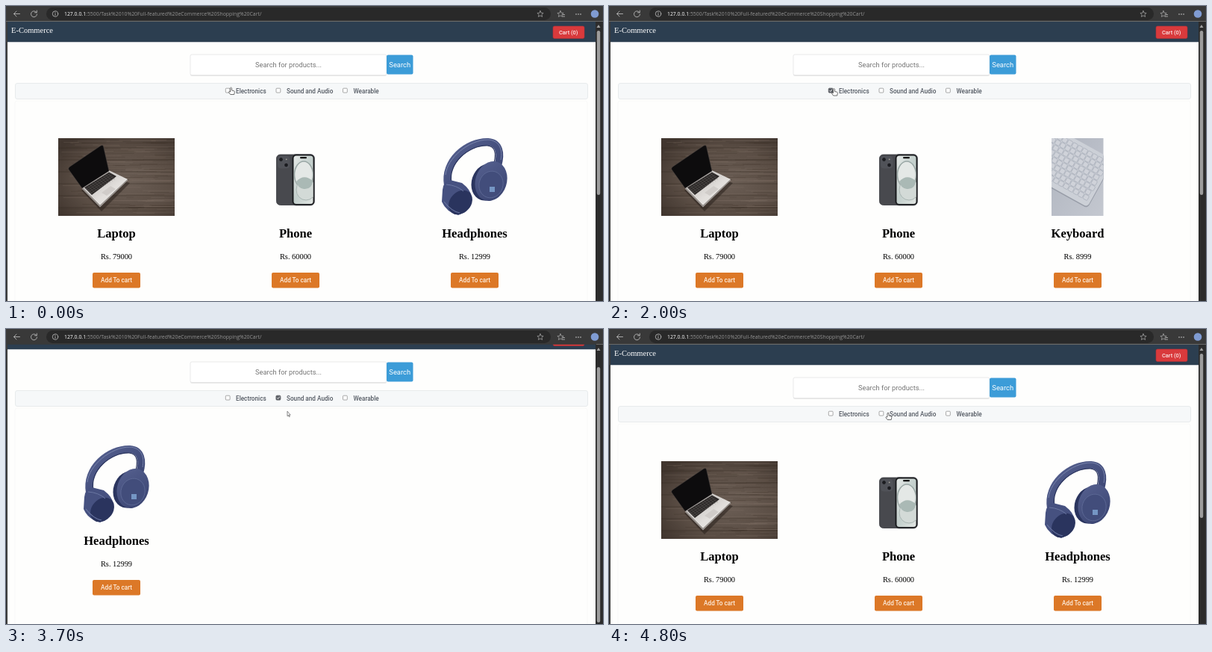
Write an HTML page that moves like this. It is 800 px wide and 395 px high and loops after 5000 ms.

```html
<!DOCTYPE html>
<html lang="en">
<head>
<meta charset="utf-8">
<title>E-Commerce</title>
<style>
  html, body { margin: 0; width: 100%; height: 100%; overflow: hidden; background: #fefefe; }
  svg { display: block; width: 800px; height: 395px; }
  .serif { font-family: "Liberation Serif", serif; }
  .sans { font-family: Roboto, sans-serif; }
  .mid { text-anchor: middle; }
  .line { fill: none; stroke: #c4c4c4; stroke-width: .8; stroke-linecap: round; stroke-linejoin: round; }
</style>
</head>
<body>
<svg viewBox="0 0 800 395">
  <defs>
    <radialGradient id="wood" cx=".58" cy=".55" r=".7">
      <stop offset="0" stop-color="#6c5f56"/><stop offset=".6" stop-color="#5a4d44"/><stop offset="1" stop-color="#41362f"/>
    </radialGradient>
    <linearGradient id="metal" x2="1" y2="1">
      <stop offset="0" stop-color="#b5b1ae"/><stop offset=".6" stop-color="#e2dfdc"/><stop offset="1" stop-color="#efedeb"/>
    </linearGradient>
    <linearGradient id="glass" x2="1" y2="1">
      <stop offset="0" stop-color="#e6eae8"/><stop offset=".5" stop-color="#c3cfcc"/><stop offset="1" stop-color="#e2e6e3"/>
    </linearGradient>
    <linearGradient id="desk" x2="1" y2="1">
      <stop offset="0" stop-color="#aeb3be"/><stop offset="1" stop-color="#c4c8d0"/>
    </linearGradient>
    <linearGradient id="navy" x2="1" y2="1">
      <stop offset="0" stop-color="#566190"/><stop offset="1" stop-color="#38426f"/>
    </linearGradient>
    <clipPath id="keyClip"><path d="M-35 177h69.500v104h-69.500z"/></clipPath>
    <clipPath id="screenClip"><rect x="-2.500" y="200.500" width="26" height="64.500" rx="3.500"/></clipPath>

    <g id="laptop">
      <path d="M-78 177h156v104h-156z" fill="url(#wood)"/>
      <g id="grain"></g>
      <path d="M-47 247L-10 226 18 237-20 275z" fill="#241d19" opacity=".5"/>
      <path d="M-46 243L-10 220 15 232-22 267z" fill="url(#metal)"/>
      <path d="M-43 243L-10 222.500 0 228-33 253z" fill="#2c2928"/>
      <g id="laptopKeys" stroke="#6a6562" stroke-width=".4"></g>
      <path d="M-20 250L-8 241-1 245-13 254z" fill="#d0ccc9"/>
      <path d="M-46 243L-22 267 15 232v1.700L-22 269.500-46 245z" fill="#9c9793"/>
      <path d="M-64 219Q-65 217-63 215.500L-21 187Q-18 185.500-17.500 188L-10 221-46 244z" fill="#0d0c0d" stroke="#4a4542" stroke-width=".5"/>
    </g>

    <g id="phone">
      <rect x="-25.500" y="199" width="34" height="67.500" rx="5" fill="#48494e" stroke="#34353a" stroke-width=".8"/>
      <rect x="-24" y="201" width="16.500" height="16.500" rx="4.500" fill="#505258"/>
      <g fill="#1b1c20" stroke="#66686f" stroke-width=".7">
        <circle cx="-19.500" cy="205.500" r="2.900"/><circle cx="-12.500" cy="213" r="2.900"/>
      </g>
      <circle cx="-12.300" cy="205.300" r=".9" fill="#aaa69c"/>
      <rect x="-5" y="198.500" width="30.500" height="68.500" rx="5.500" fill="#1b1c1f" stroke="#55575c" stroke-width=".7"/>
      <g clip-path="url(#screenClip)">
        <path d="M-3 200h27v66h-27z" fill="url(#glass)"/>
        <ellipse cx="11" cy="226" rx="12.500" ry="18" fill="#e4e8e6" stroke="#9aa7a5" stroke-width="1.500"/>
        <ellipse cx="14" cy="246" rx="13" ry="14" fill="#d3dad7" stroke="#a9b5b2"/>
        <path d="M1 235Q11 224 23 234 22 246 11 245 3 244 1 235z" fill="#aab9b5"/>
      </g>
      <rect x="6" y="202" width="9" height="2.300" rx="1.150" fill="#111"/>
    </g>

    <g id="keyboard" clip-path="url(#keyClip)">
      <path d="M-35 177h70v104h-70z" fill="url(#desk)"/>
      <g transform="translate(-2 222) rotate(29)">
        <rect x="-80" y="-38" width="116" height="72" rx="5" fill="#989da8" transform="translate(1 1.500)"/>
        <rect x="-80" y="-38" width="116" height="72" rx="5" fill="#ccd0d7"/>
        <g id="keys" fill="#cfd2d9" stroke="#a3a8b4" stroke-width=".6"></g>
      </g>
    </g>

    <g id="headphones">
      <path d="M-36 240C-42 208-10 181 18 182 33 183 36 197 31 214" fill="none" stroke="url(#navy)" stroke-width="10"/>
      <path d="M-39 226C-37 204-8 179 18 179 32 180 38 190 35 206" fill="none" stroke="#7783ab" stroke-width="1"/>
      <path d="M-31 236C-36 211-8 186 17 187 28 188 29 198 26 210" fill="none" stroke="#2c365f" stroke-width="1.200"/>
      <path d="M-43 246Q-42 235-33 233L-17 237Q-5 246-4 256-8 275-22 280-38 276-44 262z" fill="#465180"/>
      <ellipse cx="-19" cy="263" rx="18" ry="14" transform="rotate(-48 -19 263)" fill="#2a345e"/>
      <path d="M-41 262Q-31 275-20 277" fill="none" stroke="#6874a0" stroke-width="1.200"/>
      <path d="M-38 239Q-24 240-15 248" fill="none" stroke="#6b77a2" stroke-width="1"/>
      <ellipse cx="16" cy="236" rx="20" ry="25" transform="rotate(18 16 236)" fill="#2b355f"/>
      <ellipse cx="22" cy="234.500" rx="21" ry="27" transform="rotate(18 22 234.500)" fill="url(#navy)"/>
      <ellipse cx="22" cy="239" rx="16" ry="18" transform="rotate(18 22 239)" fill="#424d7b" stroke="#5f6b97" stroke-width=".8"/>
      <rect x="20" y="242" width="7" height="7" fill="#7596c4"/>
    </g>
  </defs>

  <path d="M0 0h800v395H0z" fill="#fefefd"/>
  <g id="page">
    <path d="M0 21h791v27.300H0z" fill="#2c3e50"/>
    <text class="serif" x="7" y="36" font-size="10.500" fill="#fff">E-Commerce</text>
    <rect x="733" y="27" width="42" height="16.500" rx="2" fill="#d93a3c" stroke="#b63237" stroke-width=".6"/>
    <text class="sans mid" x="753.700" y="38" font-size="7.400" font-weight="500" fill="#fbe9e9">Cart (0)</text>

    <rect x="247" y="66" width="263" height="28" rx="2" fill="#e9e9e9"/>
    <rect x="247" y="65" width="263" height="27.500" rx="2" fill="#fff" stroke="#e0e0e0" stroke-width=".7"/>
    <text class="sans mid" x="378.500" y="81.800" font-size="9.300" fill="#757575">Search for products...</text>
    <rect x="510" y="65.500" width="35.500" height="26" rx="2" fill="#3c9cd8"/>
    <text class="sans mid" x="527.700" y="81.800" font-size="9.350" fill="#fff">Search</text>

    <rect x="12.500" y="103.500" width="767" height="21" rx="2.500" fill="#f6f8f9" stroke="#e4e7e9" stroke-width=".8"/>
    <g id="filters" class="sans" font-size="8.200" font-weight="500" fill="#555b64"></g>
    <rect x="12" y="127" width="767" height="420" rx="3" fill="#fefefd" stroke="#f8f8f7" stroke-width=".8"/>
    <g id="cards"></g>
  </g>

  <path d="M0 21h2v374H0z" fill="#3a3a3a"/>
  <path d="M790 21h10v374h-10z" fill="#2c2c2c"/>
  <path d="M791.500 29l2.500-4 2.500 4z" fill="#a0a0a0"/>
  <rect id="thumb" x="791.800" width="4.400" rx="2.200" fill="#9c9c9c"/>

  <path d="M0 0h800v20.800H0z" fill="#393939"/>
  <rect x="54" y="2" width="676" height="17" rx="8.500" fill="#292929"/>
  <g class="line">
    <path d="M18.500 10.500h-8m3.500-3.500l-3.500 3.500 3.500 3.500"/>
    <path d="M40.800 8.500A4 4 0 1 0 41.500 11M41.300 6v2.800h-2.800"/>
    <circle cx="66" cy="10.500" r="3.700"/>
    <path d="M66 10v2.300M66 8.400v.1"/>
    <path id="star" d="M716 6.500l1.200 2.700 2.900.300-2.200 2 .7 2.900-2.600-1.500-2.600 1.500.7-2.900-2.200-2 2.900-.300z" stroke-width=".6"/>
    <use href="#star" x="27"/>
    <path d="M746 11.500h2.500M746.500 14h2"/>
  </g>
  <g fill="#d0d0d0"><circle cx="764" cy="11" r=".8"/><circle cx="767" cy="11" r=".8"/><circle cx="770" cy="11" r=".8"/></g>
  <circle cx="789" cy="10.500" r="5.300" fill="#7f9bd2"/>
  <text x="78" y="13" font-size="6.880" font-family="'Open Sans', sans-serif" fill="#949494"><tspan fill="#fff">127.0.0.1</tspan>:5500/Task%2010%20Full-featured%20eCommerce%20Shopping%20Cart/</text>

  <g id="cursor" fill="#fff" stroke="#333" stroke-width=".7" stroke-linejoin="round">
    <path id="hand" d="M-1 .8Q0-.7 1 .8V4L4 4.700Q5 5 4.800 6.200L4.200 9.500H-.800L-3.200 6.300Q-3 5-1 6z"/>
    <path id="arrow" d="M0 .5V7L1.400 5.700 2.400 8 3.300 7.600 2.300 5.400H4.200z" stroke="#555"/>
  </g>
</svg>
<script>
const $ = id => document.getElementById(id);
const LOOP = 5000;
const repeat = (n, draw) => Array.from({ length: n }, (_, i) => draw(i)).join('');

let seed = 7;
const random = () => (seed = seed * 16807 % 2147483647) / 2147483647;

$('grain').innerHTML = repeat(130, () => {
  const x = -78 + random() * 130, y = 178 + random() * 102;
  const length = Math.min(78 - x, 15 + random() * 60);
  return `<path d="M${x} ${y}h${length}" stroke="${random() < .5 ? '#35291f' : '#8d7d72'}" stroke-width=".8" opacity=".25"/>`;
}) + repeat(6, i => `<path d="M-78 ${190 + i * 16}h156" stroke="#30271f" stroke-width=".9" opacity=".45"/>`);

$('laptopKeys').innerHTML =
  repeat(4, i => `<path d="M${-41 + i * 2} ${245 + i * 2}l33-21"/>`) +
  repeat(11, i => `<path d="M${-42 + i * 3} ${242.500 - i * 1.850}l9.500 8.500"/>`);

$('keys').innerHTML = repeat(112, i => {
  const row = Math.floor(i / 14), column = i % 14;
  return `<rect x="${-75 + column * 7.600 + row % 3}" y="${-33 + row * 7.600}" width="6.600" height="6.600" rx="1.200"/>`;
});

// Each filter: label, checkbox x, label x.
const filters = [['Electronics', 294.300, 308], ['Sound and Audio', 362, 376], ['Wearable', 451.500, 465.500]];
$('filters').innerHTML = filters.map(([label, boxX, textX], i) => `
  <rect x="${boxX}" y="110.200" width="5.800" height="5.800" rx="1" fill="#fff" stroke="#858585" stroke-width=".7"/>
  <g id="check${i}">
    <rect x="${boxX}" y="110.200" width="5.800" height="5.800" rx="1" fill="#5b5f65" stroke="#5b5f65" stroke-width=".6"/>
    <path d="M${boxX + 1.200} 113.200l1.300 1.300 2.300-2.900" fill="none" stroke="#fff" stroke-width=".9"/>
  </g>
  <text x="${textX}" y="116.800">${label}</text>`).join('');

const card = (x, art, name, price) => `
  <g transform="translate(${x})" class="mid">
    <use href="#${art}"/>
    <text class="serif" y="309.500" font-size="16.600" font-weight="700">${name}</text>
    <text class="serif" y="339.200" font-size="10.400">Rs. ${price}</text>
    <rect x="-32" y="357" width="64" height="20.500" rx="2" fill="#dc7827"/>
    <text class="sans" y="370.300" font-size="8.200" font-weight="500" fill="#fdeee0">Add To cart</text>
  </g>`;
const headphones = x => card(x, 'headphones', 'Headphones', 12999);
$('cards').innerHTML = `
  <g id="devices">${card(148, 'laptop', 'Laptop', 79000)}${card(388, 'phone', 'Phone', 60000)}</g>
  <g id="view0">${headphones(628)}</g>
  <g id="view1">${card(628, 'keyboard', 'Keyboard', 8999)}</g>
  <g id="view2">${headphones(148)}</g>`;

const show = (id, on) => $(id).setAttribute('display', on ? 'inline' : 'none');

// Eased value at time t from rows of [time, value].
function track(t, rows) {
  const next = rows.findIndex(row => row[0] > t);
  if (next < 0) return rows[rows.length - 1][1];
  if (next === 0) return rows[0][1];
  const [t0, a] = rows[next - 1], [t1, b] = rows[next];
  const k = (t - t0) / (t1 - t0);
  return a + (b - a) * k * k * (3 - 2 * k);
}

const cursorX = [[0, 301.500], [2600, 301.500], [2950, 385], [3050, 385], [3200, 367], [3300, 367], [3500, 377], [4500, 377], [4750, 374]];
const cursorY = [[0, 109], [100, 109], [300, 110.500], [2600, 110.500], [2950, 113], [3050, 113], [3200, 111], [3300, 111], [3500, 109.700], [4500, 109.700], [4750, 112]];
const scrolling = [[3300, 0], [3600, 21], [4000, 21], [4300, 0]];

// 0: all products, 1: electronics, 2: sound and audio.
const viewAt = t => t >= 1500 && t < 2500 ? 1 : t >= 3200 && t < 4600 ? 2 : 0;

function draw(now) {
  const t = now % LOOP, view = viewAt(t), scroll = track(t, scrolling);
  filters.forEach((_, i) => {
    show('check' + i, view === i + 1);
    show('view' + i, view === i);
  });
  show('devices', view < 2);
  $('page').setAttribute('transform', `translate(0 ${-scroll})`);
  $('thumb').setAttribute('y', 33 + scroll * .86);
  $('thumb').setAttribute('height', view === 2 ? 342 : 220);
  $('cursor').setAttribute('transform', `translate(${track(t, cursorX)} ${track(t, cursorY)})`);
  show('hand', scroll < 11);
  show('arrow', scroll >= 11);
  requestAnimationFrame(draw);
}
draw(performance.now());
</script>
</body>
</html>
```
